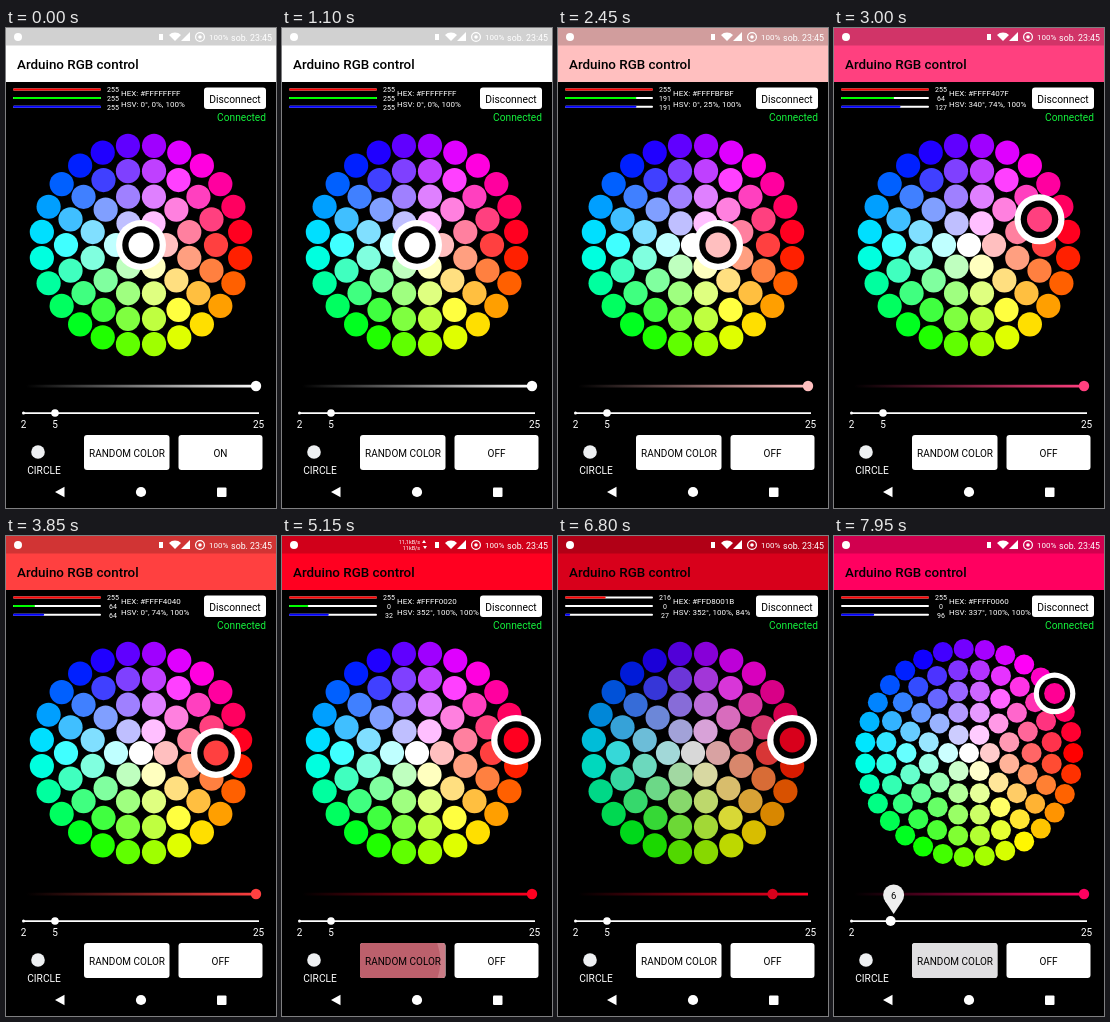
An HTML page with a canvas that plays this animation: 270x480 px, repeating every 8000 ms.

```html
<!DOCTYPE html>
<html lang="en">
<head>
<meta charset="utf-8">
<title>RGB control</title>
<style>
html, body { margin: 0; width: 100%; height: 100%; overflow: hidden; background: #000; }
canvas { display: block; width: 270px; height: 480px; }
</style>
</head>
<body>
<canvas id="stage" width="270" height="480"></canvas>
<script>
const c = document.getElementById('stage').getContext('2d');
const TAU = Math.PI * 2, LOOP = 8000, CX = 135, CY = 217;
const DENSITY_CHANGE = 7800;

// [time, hue, saturation] of each colour picked on the wheel
const picks = [
  [0, 0, 0], [2000, 0, .25], [2750, 345, .5], [2900, 340, .75], [3500, 0, .75],
  [4400, 340, .75], [5080, 352.5, 1], [7100, 337.5, 1]
];
// [time, brightness]
const lights = [[0, 1], [5850, 1], [5950, .561], [6250, .3], [6450, .3], [6900, 1]];

const clamp = x => Math.max(0, Math.min(1, x));
const mix = (a, b, k) => a + (b - a) * k;
const css = rgb => `rgb(${rgb.map(Math.round)})`;
const pickAt = t => picks.filter(p => p[0] <= t).pop() || picks[0];

function lightAt(t) {
  const i = lights.findIndex(p => p[0] > t);
  if (i < 1) return 1;
  const [t0, a] = lights[i - 1], [t1, b] = lights[i];
  return mix(a, b, (t - t0) / (t1 - t0));
}

function hsv(h, s, v) {
  return [5, 3, 1].map(n => {
    const k = (n + h / 60) % 6;
    return Math.round(255 * v * (1 - s * clamp(Math.min(k, 4 - k))));
  });
}

function colorAt(t) {
  const [, h, s] = pickAt(t);
  return hsv(h, s, lightAt(t));
}

function hsvLabel([r, g, b]) {
  const max = Math.max(r, g, b), d = max - Math.min(r, g, b);
  let h = 0;
  if (d) h = max === r ? (g - b) / d : max === g ? 2 + (b - r) / d : 4 + (r - g) / d;
  const pct = x => Math.floor(x * 100) + '%';
  return `HSV: ${Math.floor((h * 60 + 360) % 360)}°, ${pct(max ? d / max : 0)}, ${pct(max / 255)}`;
}

function rect(x, y, w, h, fill, r = 0) {
  c.fillStyle = fill;
  c.beginPath();
  c.roundRect(x, y, w, h, r);
  c.fill();
}

function dot(x, y, r, fill) {
  c.fillStyle = fill;
  c.beginPath();
  c.arc(x, y, r, 0, TAU);
  c.fill();
}

function poly(fill, ...pts) {
  c.fillStyle = fill;
  c.beginPath();
  pts.forEach(p => c.lineTo(...p));
  c.fill();
}

function text(s, x, y, size, fill = '#fff', align = 'left', weight = 400) {
  c.font = `${weight} ${size}px Roboto, sans-serif`;
  c.textAlign = align;
  c.fillStyle = fill;
  c.fillText(s, x, y);
}

function header(t, rgb, light) {
  rect(0, 0, 270, 54, css(rgb));
  rect(0, 0, 270, 17.5, css(rgb.map(v => v * .82)));
  const ink = 255 * clamp((.7 - light) / .3);
  text('Arduino RGB control', 11, 40.5, 13.4, css([ink, ink, ink]), 'left', 500);

  dot(12, 9, 4, '#fff');
  rect(153, 6, 4, 6, '#fff');
  c.fillStyle = '#fff';
  c.beginPath();
  c.moveTo(169, 13);
  c.arc(169, 13, 8.5, -Math.PI * .75, -Math.PI * .25);
  c.fill();
  poly('#fff', [175, 13], [184, 13], [184, 4]);
  c.strokeStyle = '#fff';
  c.lineWidth = 1.2;
  c.beginPath();
  c.arc(194, 9, 4.4, 0, TAU);
  c.stroke();
  dot(194, 9, 1.8, '#fff');
  text('100%', 203, 12, 8);
  text('sob. 23:45', 266, 12.5, 8.8, '#fff', 'right');

  if (t >= 4900 && t < 5500) {
    text('11,1kB/s', 138, 7.5, 5.4, '#fff', 'right');
    text('11kB/s', 138, 14, 5.4, '#fff', 'right');
    poly('#fff', [140, 7], [142, 4], [144, 7]);
    poly('#fff', [141, 10], [145, 10], [143, 13]);
  }
}

function info(t, rgb) {
  const steps = 24, span = 600;
  ['#f00', '#0f0', '#00f'].forEach((fill, n) => {
    const y = 61.5 + n * 8.6;
    let level = 0;
    // bars trail behind the colour
    for (let i = 0; i < steps; i++) level += colorAt(t - (i + .5) * span / steps)[n] / steps;
    rect(7, y - 1, 88, 2, '#fff', 1);
    rect(7, y - 1, 88 * level / 255, 2, fill, 1);
    text(rgb[n], 107, 64 + n * 9, 7, '#fff', 'center');
  });
  const hex = rgb.map(v => v.toString(16).padStart(2, '0')).join('').toUpperCase();
  text('HEX: #FF' + hex, 115, 68.3, 8);
  text(hsvLabel(rgb), 115, 79, 8);
  rect(198, 59.5, 62, 21.5, '#fff', 3);
  text('Disconnect', 229, 74.5, 10.3, '#000', 'center');
  text('Connected', 260, 93, 10.2, '#14f03c', 'right');
}

function wheel(t, light) {
  const density = t < DENSITY_CHANGE ? 5 : 6;
  const max = 127 * (1 - 1 / density) - 1.6;
  const size = max / (density - 1) / 2;
  for (let i = 0; i < density; i++) {
    const r = max * i / (density - 1);
    const total = i ? Math.floor(.975 * Math.PI / Math.asin(size / r) + .5) : 1;
    for (let j = 0; j < total; j++) {
      const a = TAU * (j + (i % 2 ? 0 : .5)) / total;
      dot(CX + r * Math.cos(a), CY + r * Math.sin(a), size - .4,
        css(hsv(a * 360 / TAU, i / (density - 1), light)));
    }
  }
  let [, hue, sat] = pickAt(t);
  if (density === 6) hue = 360 * 28 / 31;
  const a = hue * TAU / 360;
  const x = CX + max * sat * Math.cos(a), y = CY + max * sat * Math.sin(a);
  dot(x, y, size * 2, '#fff');
  dot(x, y, size * 1.5, '#000');
  dot(x, y, size, css(hsv(hue, sat, light)));
}

function sliders(t, rgb, light) {
  const [, h, s] = pickAt(t);
  const fade = c.createLinearGradient(20, 0, 250, 0);
  fade.addColorStop(0, '#000');
  fade.addColorStop(1, css(hsv(h, s, 1)));
  rect(20, 356.7, 230, 2.8, fade);
  dot(20 + 230 * light, 358, 5.2, css(rgb));

  const drag = clamp((t - 7750) / 250), x = mix(49, 58.5, drag);
  rect(17, 384.3, 236, 1.6, '#fff');
  dot(17.5, 385, 1.5, '#fff');
  dot(x, 385, t > 7700 ? 5 : 3.8, '#fff');
  text('2', 17.5, 399.5, 10, '#fff', 'center');
  text('25', 252.5, 399.5, 10, '#fff', 'center');

  const pop = clamp((t - 7650) / 150);
  if (!pop) {
    text('5', 49, 399.5, 10, '#fff', 'center');
    return;
  }
  c.save();
  c.translate(Math.min(60, x + 3), 378);
  c.scale(pop, pop);
  dot(0, -19, 10.5, '#eee');
  poly('#eee', [-9, -13.5], [9, -13.5], [0, 0]);
  text(t < DENSITY_CHANGE ? '5' : '6', 0, -15.5, 9.5, '#000', 'center');
  c.restore();
}

function buttons(t) {
  dot(32, 424, 6.8, '#eef0f2');
  text('CIRCLE', 38, 446, 10.2, '#fff', 'center');

  rect(78, 407, 85.5, 35, '#fff', 3);
  c.save();
  c.beginPath();
  c.roundRect(78, 407, 85.5, 35, 3);
  c.clip();
  if (t >= 5000 && t < 5500) {
    c.globalAlpha = clamp((5500 - t) / 300);
    rect(78, 407, 85.5, 35, '#ca7c86');
    dot(105, 425, mix(10, 70, clamp((t - 5000) / 200)) - 2, '#bc606c');
  } else if (t >= 7750) {
    c.globalAlpha = clamp((t - 7750) / 150);
    rect(78, 407, 85.5, 35, '#e0dfe1');
  }
  c.restore();
  text('RANDOM COLOR', 121, 428.5, 10, '#000', 'center');

  rect(172.5, 407, 84, 35, '#fff', 3);
  text(t < 100 ? 'ON' : 'OFF', 214.5, 428.5, 10, '#000', 'center');

  poly('#fff', [49, 464], [58.5, 458.8], [58.5, 469.2]);
  dot(135, 464, 5.1, '#fff');
  rect(211, 459.5, 9.5, 9.5, '#fff', 1);
}

function draw() {
  const t = performance.now() % LOOP;
  const light = lightAt(t), rgb = colorAt(t);
  rect(0, 0, 270, 480, '#000');
  header(t, rgb, light);
  info(t, rgb);
  wheel(t, light);
  sliders(t, rgb, light);
  buttons(t);
  requestAnimationFrame(draw);
}
draw();
</script>
</body>
</html>
```
